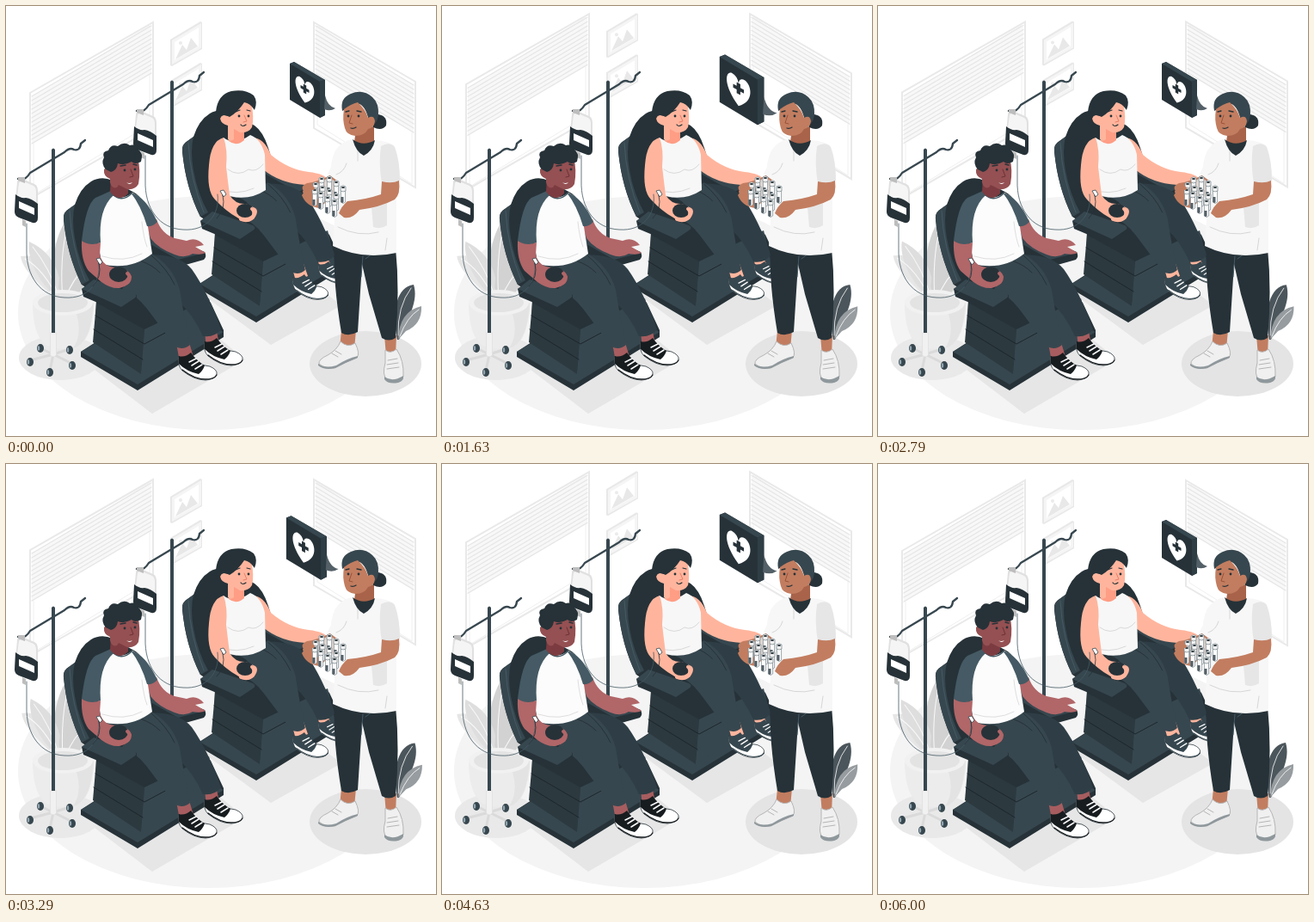
An HTML page for the animation above (6.04 s loop, 500 by 500 pixels).

```html
<!DOCTYPE html>
<html lang="en">
<head>
<meta charset="utf-8">
<title>Blood donation</title>
<style>
html, body { margin: 0; height: 100%; overflow: hidden; background: #fff; }
svg { display: block; width: 100vw; height: 100vh; }
.dark { fill: #263238; }
.slate { fill: #37474f; }
.line { fill: none; stroke-linecap: round; stroke-linejoin: round; }
</style>
</head>
<body>
<svg viewBox="0 0 500 500">
<defs>
  <g id="chair">
    <path class="dark" d="M67 248Q66 240 73 236L80 231Q86 212 99 204Q111 197 124 203L151 218Q161 225 167 244L182 292L238 345L253 377V385L153 447L87 408V402L104 391L105 335L88 324Q71 290 67 248Z"/>
    <path class="slate" d="M67 248Q66 240 73 236L80 231Q76 247 80 270Q85 298 97 319L88 324Q71 290 67 248Z"/>
    <path class="line" stroke="#455a64" d="M74 238Q76 280 92 319"/>
    <path class="slate" d="M87 402L104 392L157 424L243 374L253 379L153 440Z"/>
    <path fill="#2c393f" d="M105 345L161 376L157 428L101 391Z"/>
    <path class="slate" d="M161 376L236 340L244 374L157 428Z"/>
    <path class="line" stroke="#1c262b" d="M104 360L161 393L200 372M102 376L159 411"/>
    <path class="dark" d="M163 257L231 286Q234 291 230 295L198 304L195 316L189 312V300L160 278Z"/>
    <path class="slate" d="M163 257L231 287L200 295L163 274Z"/>
  </g>
  <g id="armrest">
    <path class="dark" d="M88 329L102 319L152 336V342L133 356L90 338Z"/>
    <path class="slate" d="M88 329L102 318L149 334Q154 337 149 340L134 350Z"/>
  </g>
  <g id="legs">
    <path fill="#2f3e46" d="M155 290Q199 286 216 306Q235 333 250 376Q242 386 229 384Q217 358 202 345L160 330Z"/>
    <path class="slate" d="M112 295Q140 309 169 288Q194 302 202 330Q207 363 214 394Q206 401 197 396Q182 376 164 352Q150 334 134 330L146 316Q140 304 120 306Z"/>
    <path class="line" stroke="#263238" d="M169 290Q187 305 196 324M158 297Q170 301 179 310"/>
  </g>
  <g id="shoe">
    <path fill="#fff" stroke="#263238" stroke-width=".8" d="M0 4Q-2 15 4 21Q18 32 31 32Q43 31 44 25Q45 20 36 16L2 10Z"/>
    <path fill="currentColor" d="M0 4Q7 6 14 0Q20 9 30 15Q28 21 23 25Q9 22 0 13Z"/>
    <path class="line" stroke="#fff" stroke-width="1.500" d="M12 11L20 7M15 15L23 10M19 19L27 14"/>
    <path class="line" stroke="currentColor" stroke-width="1.300" d="M4 20Q18 31 31 31Q41 31 44 26"/>
  </g>
  <g id="pole">
    <path class="slate" d="M53 167Q55 164 57 167V380H53Z"/>
    <path class="line" stroke="#37474f" stroke-width="2.300" d="M14 201Q22 204 28 194L68 170Q74 164 79 167Q86 169 87 160L92 156"/>
  </g>
  <g id="bag">
    <path fill="#e0e0e0" d="M13 205Q14 200 19 201L33 207Q37 209 37 215V247Q37 253 31 252L15 246Q10 244 10 239Z"/>
    <path fill="#f5f5f5" d="M15 206Q16 203 20 204L32 209Q35 211 35 216V229L13 221Z"/>
    <path class="dark" d="M11 219Q17 224 23 223Q30 224 37 230V246Q37 253 31 252L15 246Q10 244 10 239Z"/>
    <path fill="#fff" d="M15 227L33 235V243L15 235Z"/>
    <path fill="#bdbdbd" d="M14 199H22V206L14 203ZM19 248L23 250V257L19 255Z"/>
    <path class="line" stroke="#455a64" stroke-width=".8" d="M24 253V282C23 314 40 338 68 339C95 341 111 322 108 298"/>
  </g>
  <g id="needle">
    <path fill="#fff" stroke="#37474f" stroke-width=".8" d="M105 294L109 293L112 298L109 301Z"/>
    <path class="line" stroke="#263238" stroke-width=".8" d="M108 299Q112 315 101 326"/>
  </g>
  <g id="vial">
    <path fill="#fff" stroke="#78848a" stroke-width=".7" d="M-2.600 5V18Q0 21 2.600 18V5Z"/>
    <path fill="#546067" d="M-2.600 12H.5V18Q-1 20-2.600 18Z"/>
    <path fill="#f0f0f0" stroke="#78848a" stroke-width=".7" d="M-3 0Q0-2.500 3 0V5Q0 7-3 5Z"/>
    <ellipse class="dark" cy="1" rx="2" ry="1"/>
  </g>
  <g id="frame">
    <path fill="#e8e8e8" d="M191 39L226 18L228 19V50L193 70L191 69Z"/>
    <path fill="#f5f5f5" d="M193 40L227 20V49L193 68Z"/>
    <path fill="#fff" d="M196 42L224 25V47L196 63Z"/>
    <path fill="#e8e8e8" d="M197 62L205 45L210 51L215 37L223 47Z"/>
    <circle cx="203" cy="43" r="2" fill="#ebebeb"/>
  </g>
</defs>

<ellipse cx="235" cy="357" rx="221" ry="136" fill="#f4f4f4"/>
<g id="wall"><g id="windows"></g><use href="#frame"/><use href="#frame" y="48"/></g>

<g fill="#e6e6e6">
  <ellipse cx="418" cy="416" rx="65" ry="38" fill="#e4e4e4"/>
  <path d="M90 413L170 474L278 411L240 380ZM228 335L308 394L390 348L340 310Z"/>
  <ellipse cx="63" cy="409" rx="48" ry="26" fill="#e9e9e9"/>
</g>

<g id="leftPlant">
  <path fill="#d2d2d2" d="M64 345C46 310 58 263 71 248C89 267 91 311 70 345Z"/>
  <path fill="#e6e6e6" d="M62 346C45 326 20 311 17 291Q41 287 52 309Q63 325 65 346Z"/>
  <path fill="#dedede" d="M60 340C35 319 24 291 27 274Q55 287 62 316Z"/>
  <path fill="#d2d2d2" d="M67 345Q74 308 95 298Q105 317 73 345Z"/>
  <path class="line" stroke="#fafafa" d="M66 342Q62 295 71 257M61 337Q51 305 31 280M62 343Q44 306 22 294M69 340Q78 316 93 304"/>
</g>
<path fill="#ececec" d="M31 345Q31 382 46 394Q65 404 86 394Q101 384 102 345Z"/>
<path fill="#e3e3e3" d="M82 358Q89 382 78 398Q99 393 102 345Z"/>
<ellipse cx="66" cy="345" rx="35" ry="15" fill="#f1f1f1"/>
<ellipse cx="66" cy="345" rx="29" ry="11" fill="#e3e3e3"/>

<g transform="translate(138 -79)">
  <use href="#pole"/><use href="#chair"/>
</g>

<!-- seated woman -->
<g>
  <path fill="#ffb59d" d="M331 298L344 294L351 314L337 320ZM360 286L370 284L378 302L366 308Z"/>
  <use href="#shoe" transform="translate(364 297) scale(.8)" color="#37474f"/>
  <use href="#shoe" transform="translate(334 312) scale(.92)" color="#37474f"/>
  <use href="#legs" transform="translate(250 212) scale(.96) translate(-112 -295)"/>
  <path fill="#ffb59d" d="M286 153Q300 153 308 173Q328 190 352 193Q371 195 375 203Q365 214 348 208Q318 206 299 190Z"/>
  <path fill="#f7f7f7" d="M253 153Q266 163 284 150Q297 155 301 173L302 214Q278 230 248 217L243 178Z"/>
  <path class="line" stroke="#d9d9d9" d="M258 190Q270 199 282 190Q291 194 299 184M249 213Q268 221 288 212"/>
  <use href="#armrest" x="138" y="-79"/>
  <path fill="#ffb59d" d="M253 153Q238 157 236 185Q233 215 243 225Q256 239 269 246Q282 256 290 245Q294 238 290 235L279 230Q267 231 260 220L256 187Q258 167 253 153Z"/>
  <ellipse class="dark" cx="278" cy="238" rx="10" ry="8"/>
  <path class="line" stroke="#ffb59d" stroke-width="4" d="M286 236Q290 239 287 246Q281 251 273 248"/>
  <path fill="#ff9d85" d="M259 136V157Q268 164 277 156V146Z"/>
  <path fill="#ffb59d" d="M257 112H285Q289 130 286 141Q282 148 272 147L265 143V155Q261 158 258 155V139Q250 137 249 131Q250 125 258 128Z"/>
  <path class="dark" d="M251 139Q244 134 244 123Q246 103 262 99Q278 96 288 104Q293 111 289 121Q284 113 277 112Q270 123 260 129Q251 124 249 131Q249 136 251 139Z"/>
  <g class="dark"><circle cx="271" cy="128" r="1.400"/><circle cx="282" cy="128" r="1.400"/></g>
  <path class="line" stroke="#263238" stroke-width="1.200" d="M267 123L272 121M280 121L284 122M273 138Q275 141 279 138"/>
  <path class="line" stroke="#e97d68" d="M277 127L280 134L276 135"/>
</g>
<g transform="translate(138 -79)"><use href="#bag"/><use href="#needle" x="6"/></g>

<!-- seated man -->
<use href="#chair"/>
<g>
  <path fill="#a75d5f" d="M198 392L212 388L218 408L202 414ZM231 378L244 374L248 393L233 399Z"/>
  <use href="#shoe" x="231" y="386" color="#171c1f"/>
  <use href="#shoe" x="201" y="403" color="#171c1f"/>
  <use href="#legs"/>
  <path fill="#b16668" d="M162 250L175 248Q181 265 196 270L210 273Q222 268 230 278L220 280L232 287Q227 290 217 288Q208 294 196 289Q177 282 168 270Z"/>
  <path fill="#fcfcfc" d="M108 232L118 217Q134 228 147 217L160 225L170 288Q145 308 111 300L106 266Z"/>
  <path fill="#455a64" d="M122 215L104 223Q93 230 88 273Q98 281 110 275Q107 236 125 220ZM145 217Q162 221 176 251Q171 257 164 256Q157 232 145 217Z"/>
  <path class="line" stroke="#455a64" stroke-width="1.500" d="M122 217Q134 230 146 218"/>
  <path class="line" stroke="#dedede" d="M112 291Q137 299 158 288M158 251Q160 270 164 280"/>
  <use href="#armrest"/>
  <path fill="#b16668" d="M88 273Q98 280 110 275L109 289Q113 304 128 304Q143 305 146 315Q145 325 132 328Q122 329 111 321L96 308Q87 296 88 273Z"/>
  <ellipse class="dark" cx="131" cy="312" rx="11" ry="9"/>
  <path class="line" stroke="#b16668" stroke-width="4" d="M141 311Q146 315 142 321Q135 327 126 323"/>
  <path fill="#7c3b40" d="M122 199L121 216Q131 229 142 218V208Z"/>
  <path fill="#945052" d="M122 181L153 177Q157 190 154 207Q150 214 141 213L131 208L129 211Q123 213 121 205V201Q113 198 114 190Q117 186 122 190Z"/>
  <path class="dark" d="M116 190Q110 183 114 176Q111 169 119 168Q122 160 130 163Q137 157 144 162Q151 160 154 167Q160 171 157 181Q150 185 146 181Q137 186 130 183Q129 191 122 193Z"/>
  <g class="dark"><circle cx="138" cy="191" r="1.400"/><circle cx="150" cy="190" r="1.400"/></g>
  <path class="line" stroke="#263238" stroke-width="1.400" d="M133 186L139 185M148 184L152 185"/>
  <path class="line" stroke="#6d3135" d="M145 190L148 198L144 199"/>
  <path fill="#fff" d="M140 205Q143 207 147 205Q144 209 140 205Z"/>
</g>

<!-- left stand -->
<path class="line" stroke="#dadada" stroke-width="3" d="M55 405L28 412M55 405L51 424M55 405L77 416M55 405L74 399M55 405L40 398"/>
<path fill="#f1f1f1" stroke="#dedede" stroke-width=".7" d="M51.500 380H58.500V406Q55 410 51.500 406Z"/>
<g id="casters"></g>
<use href="#pole"/><use href="#bag"/><use href="#needle"/>

<!-- speech box -->
<g id="bubble">
  <path class="dark" d="M330 67L335 65L371 86V127L365 130L330 109Z"/>
  <path class="slate" d="M330 67L335 65L371 86L365 88Z"/>
  <path fill="#2f3d45" d="M365 88L371 86V127L365 130Z"/>
  <path fill="#546067" d="M371 104Q374 117 383 119Q377 123 370 120Z"/>
  <g transform="matrix(1 .57 0 1 347.500 96.500)">
    <path fill="#fff" d="M0 16C-15 4-12-10-6-11Q-1-11 0-5Q1-11 6-11C12-10 15 4 0 16Z"/>
    <path class="dark" d="M-1.700-5H1.700V-1.700H5V1.700H1.700V5H-1.700V1.700H-5V-1.700H-1.700Z"/>
  </g>
</g>

<g id="rightPlant">
  <path fill="#4b565c" d="M455 388C448 353 455 326 474 324C480 343 468 362 457 388Z"/>
  <path fill="#969c9f" d="M456 388Q457 355 483 349Q484 370 465 378Z"/>
  <path class="line" stroke="#fff" stroke-width=".8" d="M456 383Q455 349 471 328M458 384Q466 362 480 353"/>
</g>

<!-- nurse -->
<g>
  <path fill="#c27d60" d="M390 377H407L405 399L388 398ZM440 383H454L453 406L442 407Z"/>
  <path fill="#f0f0f0" stroke="#b5b5b5" d="M389 390Q397 398 406 392Q412 404 408 409Q395 414 382 421Q371 422 364 416Q363 411 374 406Q385 400 389 390ZM441 400Q447 405 454 399Q463 412 462 431Q455 439 443 435Q437 429 441 415Z"/>
  <path fill="#8f989c" d="M363 416Q371 422 384 418Q396 410 409 407V409Q396 414 383 421Q370 424 363 418ZM440 431Q449 438 462 430Q463 436 456 438Q444 440 440 434Z"/>
  <path class="line" stroke="#b5b5b5" d="M379 404L386 408M383 401L390 405M444 412L455 410M443 417L456 415M443 422L457 420"/>
  <path class="dark" d="M382 280L453 281Q458 332 453 386Q445 391 437 386L422 335L414 300L409 379Q398 385 390 380Q380 321 382 280Z"/>
  <path class="line" stroke="#455a64" d="M415 291L413 315M418 294L426 288"/>
  <path fill="#c27d60" d="M382 194Q365 204 350 206Q341 210 347 216L344 220Q349 233 364 235L386 216Z"/>
  <path fill="#f7f7f7" d="M402 155Q380 160 378 187L374 195L385 203L380 279Q415 296 454 287V207L458 203Q457 175 451 162Q443 157 430 156L414 166Z"/>
  <path fill="#e6e6e6" d="M436 163Q446 157 452 164Q458 180 458 203Q449 208 437 206Q433 184 436 163ZM425 234L443 229V255Q436 260 427 257Z"/>
  <path class="line" stroke="#d6d6d6" d="M384 196Q393 193 396 183M443 270L441 284M386 257Q410 269 433 263M409 164V180"/>
  <path fill="#c27d60" d="M437 204Q449 207 457 203Q459 219 452 225Q435 234 411 237Q403 248 393 246L387 241Q390 233 397 227Q419 225 436 219Z"/>
  <path fill="#a8634a" d="M407 143L405 158Q413 178 428 157V140Z"/>
  <path class="dark" d="M403 155Q407 170 416 174Q427 168 429 156Q415 164 403 155Z"/>
  <path class="dark" d="M433 126Q444 128 442 139Q437 146 427 141Q423 133 433 126Z"/>
  <path class="slate" d="M391 122Q388 107 401 102Q415 96 426 106Q434 113 433 127Q431 140 423 138Q419 117 411 114Q402 116 391 122Z"/>
  <path fill="#c27d60" d="M393 120Q401 114 409 112Q418 120 421 130Q428 126 429 134Q428 142 421 143Q417 151 406 151Q396 150 394 142Q391 132 393 120Z"/>
  <g class="dark"><circle cx="398" cy="128" r="1.400"/><circle cx="410" cy="128" r="1.400"/></g>
  <path class="line" stroke="#263238" stroke-width="1.300" d="M395 123L399 122M408 122L413 123M401 142Q404 143 407 141"/>
  <path class="line" stroke="#9a5238" d="M402 127L399 136L403 137"/>
  <path fill="#eceff1" opacity=".8" d="M356 211L376 199L396 214L375 231Z"/>
  <g id="vials"></g>
  <path class="line" stroke="#c27d60" stroke-width="4" d="M347 216Q352 209 357 212M392 236Q399 234 402 230"/>
</g>
</svg>
<script>
const $ = id => document.getElementById(id);

function drawWindow(x0, y0, x1, y1, h) {
  const quad = d => `M${x0 + d} ${y0 + d}L${x1 - d} ${y1 + d}V${y1 + h - d}L${x0 + d} ${y0 + h - d}Z`;
  let slats = '';
  for (let i = 0; i < 12; i++) {
    slats += `M${x0 + 2} ${y0 + 4 + i * 5}L${x1 - 2} ${y1 + 4 + i * 5}`;
  }
  return `<path d="${quad(0)}" fill="#fff" stroke="#e9e9e9" stroke-width="2"/>
    <path d="${quad(4)}" fill="#fff" stroke="#f0f0f0"/>
    <path d="M${x0 + 2} ${y0 + 4}L${x1 - 2} ${y1 + 4}V${y1 + 60}L${x0 + 2} ${y0 + 60}Z" fill="#f8f8f8"/>
    <path d="${slats}" class="line" stroke="#e6e6e6" stroke-width="1.300"/>`;
}
$('windows').innerHTML = drawWindow(28, 101, 171, 19, 123) + drawWindow(358, 19, 476, 88, 123);

$('casters').innerHTML = [[28, 414], [51, 426], [77, 418], [74, 400], [40, 398]].map(([x, y]) =>
  `<ellipse cx="${x}" cy="${y}" rx="4" ry="5" class="slate"/>
   <ellipse cx="${x - 2}" cy="${y}" rx="1.300" ry="3" fill="#90a4ae"/>`).join('');

$('vials').innerHTML = [[367, 200], [376, 199], [384, 204], [392, 210], [360, 206], [368, 210],
  [376, 214], [384, 219], [359, 213], [366, 217], [374, 222], [382, 226]].map(([x, y]) =>
  `<use href="#vial" x="${x}" y="${y}"/>`).join('');

const ease = p => p * p * (3 - 2 * p);
const swing = p => ease(1 - Math.abs(2 * p - 1));
const beats = [[0, 0], [.1, 1], [.3, 0], [.42, 1], [.52, 0], [1, 0]];

function beat(p) {
  const i = beats.findIndex(([end]) => p < end);
  const [a, from] = beats[i - 1], [b, to] = beats[i];
  return from + (to - from) * ease((p - a) / (b - a));
}

function draw() {
  const t = performance.now() % 6040;
  const quick = t % 1500 / 1500;
  const sway = 4 * swing(quick);
  const scale = 1 + .27 * beat(quick);
  $('wall').setAttribute('transform', `translate(0 ${-10 * swing(t % 3000 / 3000)})`);
  $('leftPlant').setAttribute('transform', `rotate(${sway} 66 345)`);
  $('rightPlant').setAttribute('transform', `rotate(${sway} 456 388)`);
  $('bubble').setAttribute('transform', `translate(358 98) scale(${scale}) translate(-358 -98)`);
  requestAnimationFrame(draw);
}
draw();
</script>
</body>
</html>
```
